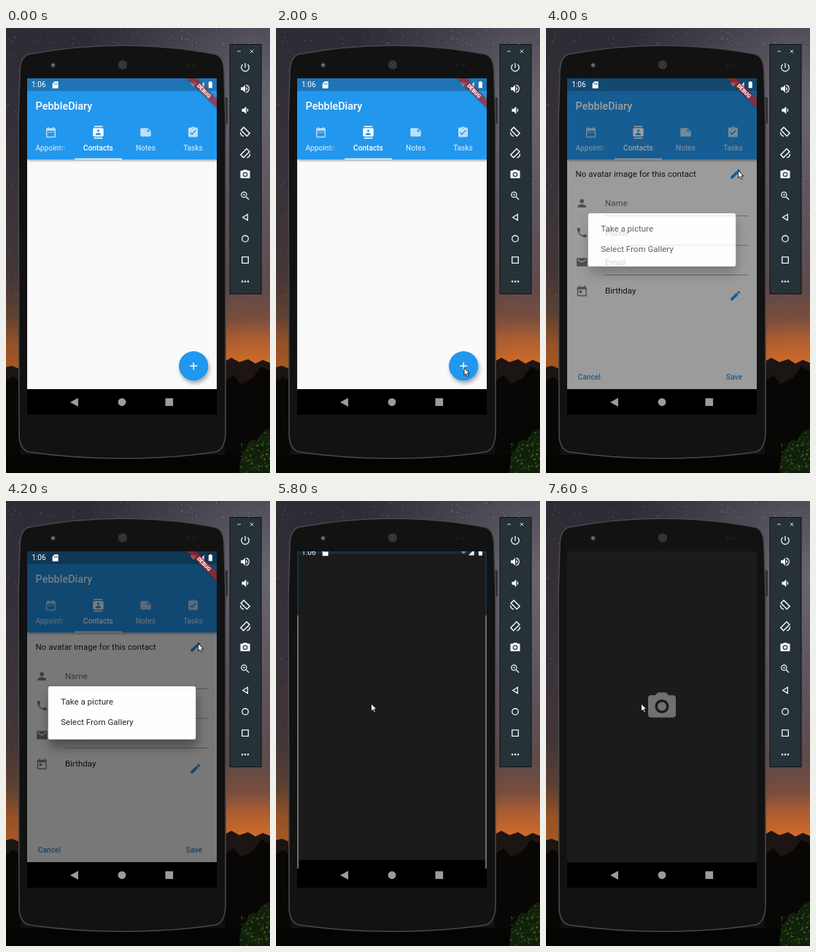
Recreate the animation shown at these times as an HTML page. Size 362 by 610 pixels, loop 8000 ms.

```html
<!DOCTYPE html>
<html lang="en">
<head>
<meta charset="utf-8">
<title>Phone emulator</title>
<style>
html, body { margin: 0; width: 100%; height: 100%; overflow: hidden; background: #111; }
svg { display: block; width: 362px; height: 610px; font-family: Roboto, sans-serif; }
</style>
</head>
<body>
<svg id="stage" viewBox="0 0 362 610"></svg>
<script>
// Icon outlines on a 24-unit grid
const ICONS = {
  dates: 'M9 11H7v2h2v-2zm4 0h-2v2h2v-2zm4 0h-2v2h2v-2zm2-7h-1V2h-2v2H8V2H6v2H5c-1.1 0-2 .9-2 2v14c0 1.1.9 2 2 2h14c1.1 0 2-.9 2-2V6c0-1.1-.9-2-2-2zm0 16H5V9h14v11z',
  contacts: 'M20 0H4v2h16V0zM4 24h16v-2H4v2zM20 4H4c-1.1 0-2 .9-2 2v12c0 1.1.9 2 2 2h16c1.1 0 2-.9 2-2V6c0-1.1-.9-2-2-2zm-8 2.75a2.25 2.25 0 1 1 0 4.5a2.25 2.25 0 1 1 0-4.5zM17 17H7v-1.5c0-1.67 3.33-2.5 5-2.5s5 .83 5 2.5V17z',
  note: 'M22 10l-6-6H4c-1.1 0-2 .9-2 2v12c0 1.1.9 2 2 2h16c1.1 0 2-.9 2-2v-8zm-7-4.5l5.5 5.5H15V5.5z',
  task: 'M19 3h-4.18a3 3 0 0 0-5.64 0H5c-1.1 0-2 .9-2 2v14c0 1.1.9 2 2 2h14c1.1 0 2-.9 2-2V5c0-1.1-.9-2-2-2zm-7 0a1 1 0 1 1 0 2a1 1 0 1 1 0-2zm-2 14l-4-4 1.41-1.41L10 14.17l6.59-6.59L18 9l-8 8z',
  person: 'M12 12a4 4 0 1 0 0-8a4 4 0 1 0 0 8zm0 2c-2.67 0-8 1.34-8 4v2h16v-2c0-2.66-5.33-4-8-4z',
  phone: 'M6.62 10.79c1.44 2.83 3.76 5.14 6.59 6.59l2.2-2.2c.27-.27.67-.36 1.02-.24 1.12.37 2.33.57 3.57.57.55 0 1 .45 1 1V20c0 .55-.45 1-1 1-9.39 0-17-7.61-17-17 0-.55.45-1 1-1h3.5c.55 0 1 .45 1 1 0 1.25.2 2.45.57 3.57.11.35.03.74-.25 1.02l-2.2 2.2z',
  mail: 'M20 4H4c-1.1 0-2 .9-2 2v12c0 1.1.9 2 2 2h16c1.1 0 2-.9 2-2V6c0-1.1-.9-2-2-2zm0 4l-8 5-8-5V6l8 5 8-5v2z',
  today: 'M19 3h-1V1h-2v2H8V1H6v2H5c-1.1 0-2 .9-2 2v14c0 1.1.9 2 2 2h14c1.1 0 2-.9 2-2V5c0-1.1-.9-2-2-2zm0 16H5V8h14v11zM7 10h5v5H7z',
  edit: 'M3 17.25V21h3.75L17.81 9.94l-3.75-3.75L3 17.25zM20.71 7.04c.39-.39.39-1.02 0-1.41l-2.34-2.34c-.39-.39-1.02-.39-1.41 0l-1.83 1.83 3.75 3.75 1.83-1.83z',
  add: 'M19 13h-6v6h-2v-6H5v-2h6V5h2v6h6v2z',
  camera: 'M12 8.8a3.2 3.2 0 1 0 0 6.4a3.2 3.2 0 1 0 0-6.4zM9 2L7.17 4H4c-1.1 0-2 .9-2 2v12c0 1.1.9 2 2 2h16c1.1 0 2-.9 2-2V6c0-1.1-.9-2-2-2h-3.17L15 2H9zm3 15a5 5 0 1 1 0-10a5 5 0 1 1 0 10z',
  power: 'M13 3h-2v10h2V3zm4.83 2.17l-1.42 1.42A7 7 0 1 1 7.58 6.58L6.17 5.17a9 9 0 1 0 11.66 0z',
  louder: 'M3 9v6h4l5 5V4L7 9H3zm13.5 3c0-1.77-1.02-3.29-2.5-4.03v8.05c1.48-.73 2.5-2.25 2.5-4.02zM14 3.23v2.06a7 7 0 0 1 0 13.42v2.06a9 9 0 0 0 0-17.54z',
  quieter: 'M18.5 12c0-1.77-1.02-3.29-2.5-4.03v8.05c1.48-.73 2.5-2.25 2.5-4.02zM5 9v6h4l5 5V4L9 9H5z',
  zoom: 'M15.5 14h-.79l-.28-.27A6.5 6.5 0 1 0 13.73 14.43l.27.28v.79l5 5L20.49 19l-5-5zm-6 0a4.5 4.5 0 1 1 0-9a4.5 4.5 0 1 1 0 9zM12 10h-2v2H9v-2H7V9h2V7h1v2h2v1z',
  turn: 'M9 1.500L23 15.500 15.500 23 1.500 9zM9 4.700L4.700 9 15.500 19.800 19.800 15.500zM1 13.500h2.200a8 8 0 0 0 6 7.300l-.6 2.100A10 10 0 0 1 1 13.500z',
  back: 'M18 4v16L5 12zM16 7.6L8.8 12l7.2 4.4z',
  home: 'M12 4.5a7.5 7.5 0 1 0 0 15a7.5 7.5 0 1 0 0-15zm0 2a5.5 5.5 0 1 1 0 11a5.5 5.5 0 1 1 0-11z',
  square: 'M4.5 4.5h15v15h-15zM6.5 6.5v11h11v-11z',
  more: 'M6 10a2 2 0 1 0 0 4a2 2 0 1 0 0-4zm6 0a2 2 0 1 0 0 4a2 2 0 1 0 0-4zm6 0a2 2 0 1 0 0 4a2 2 0 1 0 0-4z'
};
const BLUE = '#2497ee';
const rect = (x, y, w, h, fill, extra = '') =>
  `<rect x="${x}" y="${y}" width="${w}" height="${h}" fill="${fill}" ${extra}/>`;
const dot = (x, y, r, fill, extra = '') => `<circle cx="${x}" cy="${y}" r="${r}" fill="${fill}" ${extra}/>`;
const path = (d, fill, extra = '') => `<path d="${d}" fill="${fill}" ${extra}/>`;
const text = (s, x, y, size, fill, extra = '') =>
  `<text x="${x}" y="${y}" font-size="${size}" fill="${fill}" ${extra}>${s}</text>`;
const icon = (name, x, y, fill, k = 1, extra = '') =>
  path(ICONS[name], fill, `fill-rule="evenodd" transform="translate(${x - 12 * k} ${y - 12 * k}) scale(${k})" ${extra}`);
const grad = (id, stops, dir = 'x2="0" y2="1"') => `<linearGradient id="${id}" ${dir}>` +
  stops.map(([o, c]) => `<stop offset="${o}" stop-color="${c}"/>`).join('') + '</linearGradient>';

let seed = 7;
const rnd = () => (seed = seed * 16807 % 2147483647) / 2147483647;
function specks(n, x, y, w, h, colors, size) {
  let s = '';
  for (let i = 0; i < n; i++)
    s += dot((x + rnd() * w).toFixed(1), (y + rnd() * h).toFixed(1), (.3 + rnd() * size).toFixed(2),
      colors[rnd() * colors.length | 0], `opacity="${(.2 + rnd() * .5).toFixed(2)}"`);
  return s;
}

const scenery = rect(0, 0, 362, 480, 'url(#skyL)') + rect(0, 0, 362, 480, 'url(#skyR)', 'mask="url(#toRight)"') +
  specks(170, 0, 0, 362, 24, ['#8a8694', '#17151d', '#b5b0bb'], .5) +
  specks(150, 0, 24, 20, 350, ['#8a8694', '#17151d'], .5) +
  specks(220, 302, 24, 60, 330, ['#a8a3b1', '#2c2933'], .5) +
  path('M0 465L8 463 18 467V610H0zM300 457L309 452 320 458 332 454 342 460 352 455 362 459V610H300z', '#1c1513') +
  path('M0 484L10 478 20 485V610H0zM300 484L312 476 322 488 338 480 350 464 362 470V610H300z', '#080706') +
  rect(0, 585, 362, 25, '#040403') +
  path('M320 610Q320 584 330 574Q336 560 344 566Q352 550 362 550V610z', '#12200b') +
  specks(130, 322, 568, 40, 42, ['#3e6d22', '#5a9430', '#0b1406'], 1.3) +
  specks(30, 344, 552, 18, 18, ['#3e6d22', '#0b1406'], 1.2);

const phone = rect(15, 131, 4, 90, '#303034', 'rx="1"') + rect(300, 95, 4, 36, '#303034', 'rx="1"') +
  path('M19 62Q19 40 31 36Q95 24 160 24Q225 24 287 36Q299 39 299 62L301 130V556Q300 577 288 581Q230 590 160 590Q90 590 31 581Q18 577 18 556L17 130z',
    '#121212', 'stroke="#48484a" stroke-width="1.6"') +
  dot(65, 51, 4, '#1f2025') + dot(64.5, 51, 2.4, '#6c6a80') +
  dot(160, 50.5, 6.2, '#3c3c3c') + dot(160, 50.5, 5, 'none', 'stroke="#161616" stroke-dasharray="1 1"') +
  dot(160, 50.5, 2.5, 'none', 'stroke="#161616" stroke-dasharray="1 1"') +
  dot(249, 51, 2, '#1d1d1f') + dot(258, 51, 2, '#1d1d1f');

const tools = ['power', 'louder', 'quieter', 'turn', 'turn', 'camera', 'zoom', 'back', 'home', 'square', 'more'];
const panel = rect(307, 22.5, 43, 342, '#263238', 'stroke="#0c1114"') +
  path('M317 32h5M334.8 29.8l4.4 4.4m0-4.4l-4.4 4.4', 'none', 'stroke="#d5dadc"') +
  tools.map((n, i) => {
    const y = 54 + i * 29.35;
    return `<g${i == 4 ? ` transform="matrix(-1 0 0 1 656 0)"` : ''}>${icon(n, 328, y, '#f4f6f6', .66)}</g>`;
  }).join('');

const tabs = [['Appointments', 'dates'], ['Contacts', 'contacts'], ['Notes', 'note'], ['Tasks', 'task']];
const appBar = rect(0, 0, 360, 154, BLUE, 'filter="url(#shade)"') + rect(0, 0, 360, 24, '#1f74b5') +
  text('PebbleDiary', 16, 59.5, 20, '#fff', 'font-weight="500"') +
  tabs.map(([label, name], i) => {
    const x = 45 + i * 90, o = i == 1 ? 1 : .7;
    return icon(name, x, 102.5, '#fff', 1, `opacity="${o}"`) +
      text(label, i ? x : 16, 137, 14, i ? '#fff' : 'url(#fade)',
        `font-weight="500" opacity="${o}" ${i ? 'text-anchor="middle"' : ''}`);
  }).join('') + rect(90, 152, 90, 2, '#fff');

const fab = dot(316, 546, 28, BLUE, 'filter="url(#lift)"') + icon('add', 316, 546, '#fff');

const field = (name, label, y) => icon(name, 28, y, '#808080') + text(label, 72, y + 5.5, 16, '#747474') +
  rect(72, y + 23.5, 272, 1, '#8c8c8c');
const form = text('No avatar image for this contact', 16, 187, 16, '#212121') + icon('edit', 319.5, 181.5, BLUE) +
  field('person', 'Name', 237) + field('phone', 'Phone', 293) + field('mail', 'Email', 349) +
  icon('today', 28, 404.5, '#808080') + text('Birthday', 72, 408.5, 16, '#212121') + icon('edit', 319.5, 412.5, BLUE) +
  text('Cancel', 20.5, 571.5, 14, BLUE, 'font-weight="500"') + text('Save', 302, 571.5, 14, BLUE, 'font-weight="500"');

const dialog = rect(0, 0, 360, 590, '#000', 'opacity=".54"') +
  rect(40, 256, 280, 101, '#fff', 'rx="4" filter="url(#float)"') +
  text('Take a picture', 64, 290.5, 16, '#212121') + text('Select From Gallery', 64, 329.5, 16, '#212121');

const ribbon = `<g transform="translate(360 0) rotate(45)">` +
  rect(-40, 28, 80, 12, '#b71c1c', 'opacity=".7" filter="url(#soft)"') +
  text('DEBUG', 0, 37.6, 10.2, '#fff', 'font-weight="900" text-anchor="middle"') + '</g>';

const status = text('1:06', 8.5, 17.2, 14, '#fff') +
  path('M52 6h7v13H48V10zM51 9v3h1.2V9zm2.5 0v3h1.2V9zm2.5 0v3h1.2V9z', '#fff', 'fill-rule="evenodd"') +
  path('M310 9Q316 4 322 9L316 16z', '#fff', 'opacity=".45"') + path('M336 7V18H325z', '#fff', 'opacity=".9"') +
  path('M344.500 7h2V5.500h3V7h2V18.500h-7z', '#fff');

const opening = rect(0, 0, 360, 122, '#0b3150') + rect(0, 122, 360, 480, '#6d6d6d') +
  rect(2.8, 4.5, 354.4, 598, '#1b1b1b') + rect(2.8, 586, 354.4, 53, '#000');

const nav = path('M88 513l11-6v12z', '#9c9c9c') + dot(159, 512.8, 5.4, '#9c9c9c') + rect(218.5, 507.5, 10.6, 10.6, '#9c9c9c');
const group = (id, body) => `<g id="${id}">${body}</g>`;

stage.innerHTML = '<defs>' +
  grad('skyL', [[0, '#2e2b35'], [.45, '#39323a'], [.7, '#433637'], [.82, '#5f4131'], [.9, '#955126'], [1, '#ad5a1f']]) +
  grad('skyR', [[0, '#504d59'], [.2, '#69656f'], [.5, '#5f555f'], [.74, '#5f4a4a'], [.83, '#794e3e'], [.89, '#ad5e32'], [.95, '#cd6a29'], [1, '#d06c2a']]) +
  grad('ramp', [[.3, '#000'], [.9, '#fff']], 'x2="1" y2="0"') +
  `<mask id="toRight">${rect(0, 0, 362, 480, 'url(#ramp)')}</mask>` +
  grad('fade', [[0, '#fff'], [1, BLUE]], 'gradientUnits="userSpaceOnUse" x1="60" x2="74" y1="0" y2="0"') +
  '<filter id="shade" y="-10%" height="130%"><feDropShadow dy="2" stdDeviation="2" flood-opacity=".4"/></filter>' +
  '<filter id="lift" x="-30%" y="-30%" width="160%" height="170%"><feDropShadow dy="5" stdDeviation="4" flood-opacity=".32"/></filter>' +
  '<filter id="float" x="-30%" y="-50%" width="160%" height="240%"><feDropShadow dy="14" stdDeviation="11" flood-opacity=".42"/></filter>' +
  '<filter id="soft" y="-60%" height="220%"><feDropShadow dy="0" stdDeviation="2.5" flood-opacity=".5"/></filter>' +
  '<clipPath id="screen"><rect width="360" height="638.4"/></clipPath></defs>' +
  scenery + phone + panel +
  '<g transform="translate(29 69) scale(.7222)"><g clip-path="url(#screen)">' +
  rect(0, 0, 360, 590, '#fafafa') + rect(0, 590, 360, 49, '#000') +
  group('app', appBar + group('fab', fab) + group('form', form) + group('dialog', dialog)) +
  group('opening', opening) + group('camera', rect(0, 0, 360, 590.3, '#1b1b1b')) + group('status', status) +
  group('ribbon', ribbon) +
  '</g></g>' + nav + group('lens', icon('camera', 159, 281.5, '#707070', 1.9)) +
  group('cursor', path('M0 0V10.2L2.4 8 4.2 11.8 5.9 11 4.2 7.3H7.4z', '#fff', 'stroke="#111" stroke-width=".9"'));

// Pointer stops: time, x, y
const STOPS = [[800, 350, 592], [2000, 258, 466], [2400, 258, 466], [3200, 156.5, 225.5],
  [3800, 263.5, 195.5], [4200, 263.5, 195.5], [5200, 130.5, 278], [8000, 130.5, 278]];
const el = id => document.getElementById(id);
const show = (id, opacity) => el(id).setAttribute('opacity', +opacity);

function pointer(t) {
  const i = Math.max(1, STOPS.findIndex(s => s[0] > t));
  const [t0, x0, y0] = STOPS[i - 1], [t1, x1, y1] = STOPS[i];
  const u = Math.max(0, (t - t0) / (t1 - t0)), e = u * u * (3 - 2 * u);
  return `translate(${x0 + (x1 - x0) * e} ${y0 + (y1 - y0) * e})`;
}

function draw() {
  const t = Math.floor(performance.now() % 8000 / 200) * 200;
  const launching = t >= 5800 && t < 6000;
  show('fab', t < 2400);
  show('form', t >= 2400);
  show('dialog', t < 4000 ? 0 : t < 4200 ? .7 : t < 4400 ? .96 : 1);
  show('app', t < 5800);
  show('ribbon', t < 5800);
  show('opening', launching);
  show('camera', t >= 6000);
  show('status', t < 6000);
  el('status').setAttribute('transform', `translate(0 ${launching ? -10.5 : 0})`);
  show('lens', t < 7400 ? 0 : t < 7600 ? .5 : 1);
  show('cursor', t >= 800);
  el('cursor').setAttribute('transform', pointer(t));
  requestAnimationFrame(draw);
}
draw();
</script>
</body>
</html>
```
